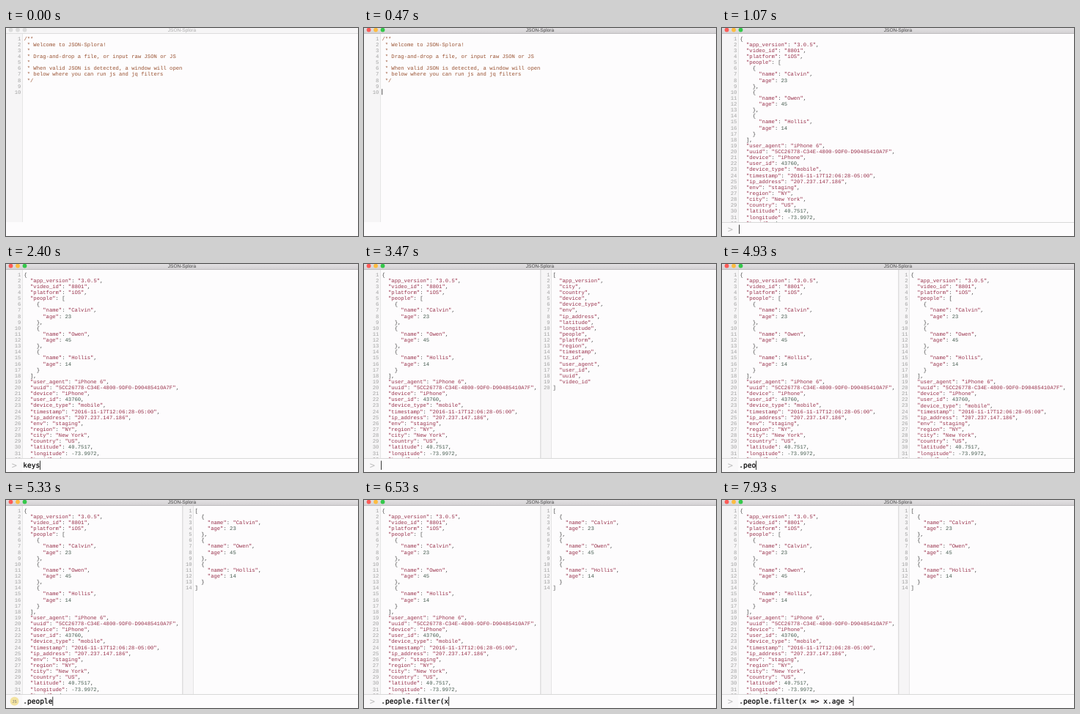
Recreate the animation shown at these times as an HTML page. Size 480 px wide and 284 px high, loop 8 s.

```html
<!DOCTYPE html>
<html lang="en">
<head>
<meta charset="utf-8">
<title>JSON-Splora</title>
<style>
  html, body { margin: 0; width: 100%; height: 100%; overflow: hidden; background: #fdfcfd; }
  svg { display: block; width: 480px; height: 284px; }
  text { white-space: pre; text-rendering: geometricPrecision; }
  .code { font: 7.2px "Liberation Mono", monospace; }
  .num { fill: #a2a2a2; text-anchor: end; }
  .str { fill: #98304a; }
  .val { fill: #465c50; }
  .note { fill: #98502f; }
  .plain { fill: #444; }
  .title { font: 6.5px "Liberation Sans", sans-serif; text-anchor: middle; }
  .input { font: 9.57px "DejaVu Sans Mono", monospace; fill: #000; stroke: #000; stroke-width: 0.2px; }
</style>
</head>
<body>
<svg id="stage" viewBox="0 0 480 284" xmlns="http://www.w3.org/2000/svg">
  <defs>
    <linearGradient id="chrome" x2="0" y2="1">
      <stop offset="0" stop-color="#e2e0e2"/>
      <stop offset="1" stop-color="#d3d1d3"/>
    </linearGradient>
    <clipPath id="editor"><rect y="8" width="480" height="257"/></clipPath>
  </defs>
  <rect width="480" height="284" fill="#fdfcfd"/>
  <g id="panes" clip-path="url(#editor)"></g>
  <g id="bar"></g>
  <g id="top"></g>
</svg>
<script>
const NS = "http://www.w3.org/2000/svg";
const LOOP = 8000, FIRST = 16.6, PITCH = 8.13, CHAR = 4.32, KEY = 5.762;
const $ = id => document.getElementById(id);

function add(parent, tag, attrs = {}, label) {
  const el = document.createElementNS(NS, tag);
  for (const k in attrs) el.setAttribute(k, attrs[k]);
  if (label !== undefined) el.textContent = label;
  parent.appendChild(el);
  return el;
}
const rect = (p, x, y, width, height, fill) => add(p, "rect", { x, y, width, height, fill });
const show = (el, on) => el.setAttribute("visibility", on ? "visible" : "hidden");

// Documents
const people = [["Calvin", 23], ["Owen", 45], ["Hollis", 14]].map(([name, age]) => ({ name, age }));
const data = {
  app_version: "3.0.5",
  video_id: "8801",
  platform: "iOS",
  people,
  user_agent: "iPhone 6",
  uuid: "5CC26778-C34E-4800-9DF0-D90485410A7F",
  device: "iPhone",
  user_id: 43760,
  device_type: "mobile",
  timestamp: "2016-11-17T12:06:28-05:00",
  ip_address: "207.237.147.186",
  env: "staging",
  region: "NY",
  city: "New York",
  country: "US",
  latitude: 40.7517,
  longitude: -73.9972,
  tz_id: 4
};
const lines = value => JSON.stringify(value, null, 2).split("\n");
const welcome = [
  "/**",
  " * Welcome to JSON-Splora!",
  " *",
  " * Drag-and-drop a file, or input raw JSON or JS",
  " *",
  " * When valid JSON is detected, a window will open",
  " * below where you can run js and jq filters",
  " */", "", ""
];

function drawLine(g, line, x, y, note) {
  const parts = note ? /\S+/g : /"[^"]*"|-?\d[\d.]*|[^\s"\d-]+/g;
  for (const m of line.matchAll(parts)) {
    const s = m[0];
    const kind = note ? "note" : s[0] === '"' ? "str" : /\d/.test(s) ? "val" : "plain";
    add(g, "text", { class: "code " + kind, x: x + m.index * CHAR, y }, s);
  }
}

// A code pane whose gutter spans left to edge
function pane(left, edge, list, note) {
  const g = add($("panes"), "g");
  if (left) rect(g, left, 8, 480 - left, 257, "#fdfcfd");
  rect(g, left, 8, edge - left, 257, "#f6f5f6");
  rect(g, edge, 8, 0.6, 257, "#d8d8d8");
  if (left) rect(g, left - 0.6, 8, 0.9, 257, "#ccc");
  const back = add(g, "g");
  // The slight turn keeps baselines from snapping to whole pixels
  const code = add(g, "g", { transform: "rotate(0.01)" });
  list.forEach((line, i) => {
    const y = FIRST + i * PITCH;
    add(code, "text", { class: "code num", x: edge - 1.6, y }, i + 1);
    drawLine(code, line, edge + 2.4, y, note);
  });
  return { g, back };
}

const intro = pane(0, 22, welcome, true);
const selection = rect(intro.back, 22.6, 10, 458, 9 * PITCH, "#d7d4f0");
const caret = rect(intro.back, 24.4, 83.2, 0.7, 8, "#111");
const source = pane(0, 22, lines(data));
const results = {
  keys: pane(241, 255.2, lines(Object.keys(data).sort())),
  all: pane(241, 255.2, lines(data)),
  people: pane(241, 255.2, lines(people))
};

// Title bar
function titleBar(fill, ink, edge, lights) {
  const g = add($("top"), "g");
  rect(g, 0, 0, 480, 7.4, fill);
  rect(g, 0, 7.2, 480, 0.8, edge);
  lights.forEach((c, i) => add(g, "circle", { cx: 6.5 + i * 9.5, cy: 2.6, r: 2.9, fill: c }));
  add(g, "text", { class: "title", x: 240, y: 5, fill: ink }, "JSON-Splora");
  return g;
}
const idle = titleBar("#f6f5f6", "#aaa", "#d6d6d6", ["#dcdcdc", "#dcdcdc", "#dcdcdc"]);
const active = titleBar("url(#chrome)", "#444", "#b4b2b4", ["#fc5b57", "#fdbc40", "#34c84a"]);

// Filter bar
const bar = $("bar");
rect(bar, 0, 265, 480, 19, "#fdfcfd");
rect(bar, 0, 265, 22, 19, "#f9f8f9");
rect(bar, 0, 265, 480, 0.8, "#d0d0d0");
const badges = { ">": add(bar, "g"), jq: add(bar, "g"), JS: add(bar, "g") };
const mono = size => ({ "font-family": "'DejaVu Sans Mono', monospace", "font-size": size });
add(badges[">"], "text", { ...mono(12), x: 7.8, y: 279.2, fill: "#bbb" }, ">");
add(badges.jq, "text", { ...mono(7), x: 7.1, y: 277, fill: "#777" }, "jq");
add(badges.JS, "circle", { cx: 11.6, cy: 274.8, r: 6, fill: "#f3e3a1" });
add(badges.JS, "text", { ...mono(5.4), x: 11.6, y: 276.8, fill: "#777", "text-anchor": "middle" }, "JS");
const input = add(bar, "text", { class: "input", x: 23.2, y: 278.2 });
const cursor = rect(bar, 23, 268.6, 0.9, 12.4, "#222");

// Keystrokes: [time, text]
const strokes = [[1000, ""]];
function type(base, text, times) {
  times.forEach((t, i) => strokes.push([t, base + text.slice(0, i + 1)]));
}
type("", "keys", [2000, 2130, 2270, 2330]);
strokes.push([3270, ""]);
type("", ".people", [3870, 4670, 4870, 4930, 5000, 5130, 5200]);
type(".people", ".filter(x", [5800, 5930, 6000, 6070, 6130, 6200, 6270, 6400, 6520]);
type(".people.filter(x", " => x.age >", [6730, 6870, 7000, 7070, 7200, 7330, 7400, 7470, 7600, 7730, 7870]);

const badgeSteps = [[0, ">"], [2600, "jq"], [3270, ">"], [4000, "jq"], [4670, ">"], [5270, "JS"], [5800, ">"]];
const resultSteps = [[0, ""], [2600, "keys"], [4000, "all"], [5270, "people"]];
const at = (steps, t) => steps.reduce((cur, s) => (s[0] <= t ? s : cur), steps[0]);

function render(t) {
  const loaded = t >= 1000, focused = t >= 330;
  show(idle, !focused);
  show(active, focused);
  show(intro.g, !loaded);
  show(caret, focused && t < 730);
  show(selection, t >= 730 && !loaded);
  show(source.g, loaded);
  bar.setAttribute("display", loaded ? "inline" : "none");

  const result = at(resultSteps, t)[1], badge = at(badgeSteps, t)[1];
  for (const k in results) show(results[k].g, k === result);
  for (const k in badges) show(badges[k], k === badge);

  const [since, text] = at(strokes, t);
  input.textContent = text;
  cursor.setAttribute("x", 23 + text.length * KEY);
  show(cursor, (t - since) % 1060 < 530);
}

function tick() {
  render(performance.now() % LOOP);
  requestAnimationFrame(tick);
}
tick();
</script>
</body>
</html>
```
